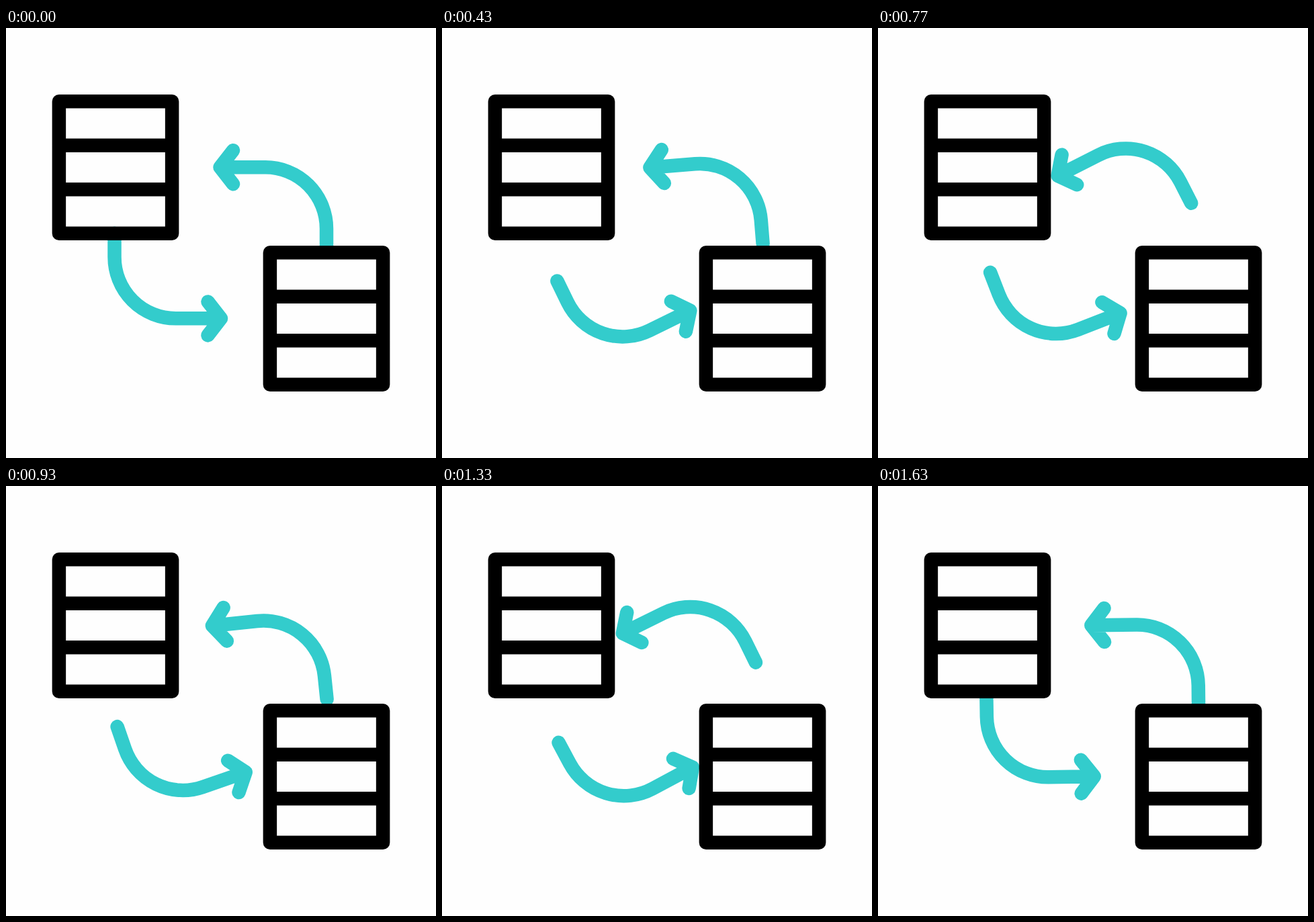
Recreate the animation shown at these times as an HTML page. Size 640 by 640 pixels, loop 1.67 s.

```html
<!DOCTYPE html>
<html lang="en">
<head>
<meta charset="utf-8">
<title>Data exchange</title>
<style>
  html, body { margin: 0; width: 100%; height: 100%; overflow: hidden; background: #fefefe; }
  svg { display: block; width: 100vw; height: 100vh; }
  .line { fill: none; stroke-width: 20.5; stroke-linecap: round; stroke-linejoin: round; }
  .arrow { stroke: #33cccc; }
  .server { stroke: #000; }
</style>
</head>
<body>
<svg viewBox="0 0 640 640">
  <defs>
    <path id="arrow" class="line arrow" d="M161.5 305.8V341A91 91.3 0 0 0 252.5 432.3H320M300.5 407.4L320 432.3L300.5 457.4"/>
    <path id="server" class="line server" d="M78.9 109.3H247.1V305.7H78.9ZM78.9 174.7H247.1M78.9 240.3H247.1"/>
  </defs>
  <use id="lower" href="#arrow"/>
  <use id="upper" href="#arrow"/>
  <use href="#server"/>
  <use href="#server" x="314" y="225"/>
</svg>
<script>
  const LOOP = 1670, FRAMES = 50, FRAME_MS = 1000 / 30;
  const PIVOT = "319.25 319.8";

  // Each arrow swings between rest and its full angle; turns are the frames where it reverses.
  const swings = [
    { el: document.getElementById("lower"), base: 0, angle: 28.6, turns: [3.5, 11.7, 18.8, 25.1, 32.6, 40.6, 50] },
    { el: document.getElementById("upper"), base: 180, angle: 27.1, turns: [0, 7.4, 15, 22.7, 30.3, 38.8, 50] }
  ];

  const ease = t => t * t * (3 - 2 * t);

  function swingAt(frame, turns) {
    if (frame <= turns[0]) return 0;
    const i = turns.findIndex(turn => turn > frame);
    const part = ease((frame - turns[i - 1]) / (turns[i] - turns[i - 1]));
    return i % 2 ? part : 1 - part;
  }

  function draw(now) {
    const frame = Math.min(FRAMES - 1, Math.floor((now % LOOP + 5) / FRAME_MS));
    for (const { el, base, angle, turns } of swings) {
      const turn = base - angle * swingAt(frame, turns);
      el.setAttribute("transform", `rotate(${turn} ${PIVOT})`);
    }
  }

  const start = performance.now();
  function tick() {
    draw(performance.now() - start);
    requestAnimationFrame(tick);
  }
  tick();
</script>
</body>
</html>
```
